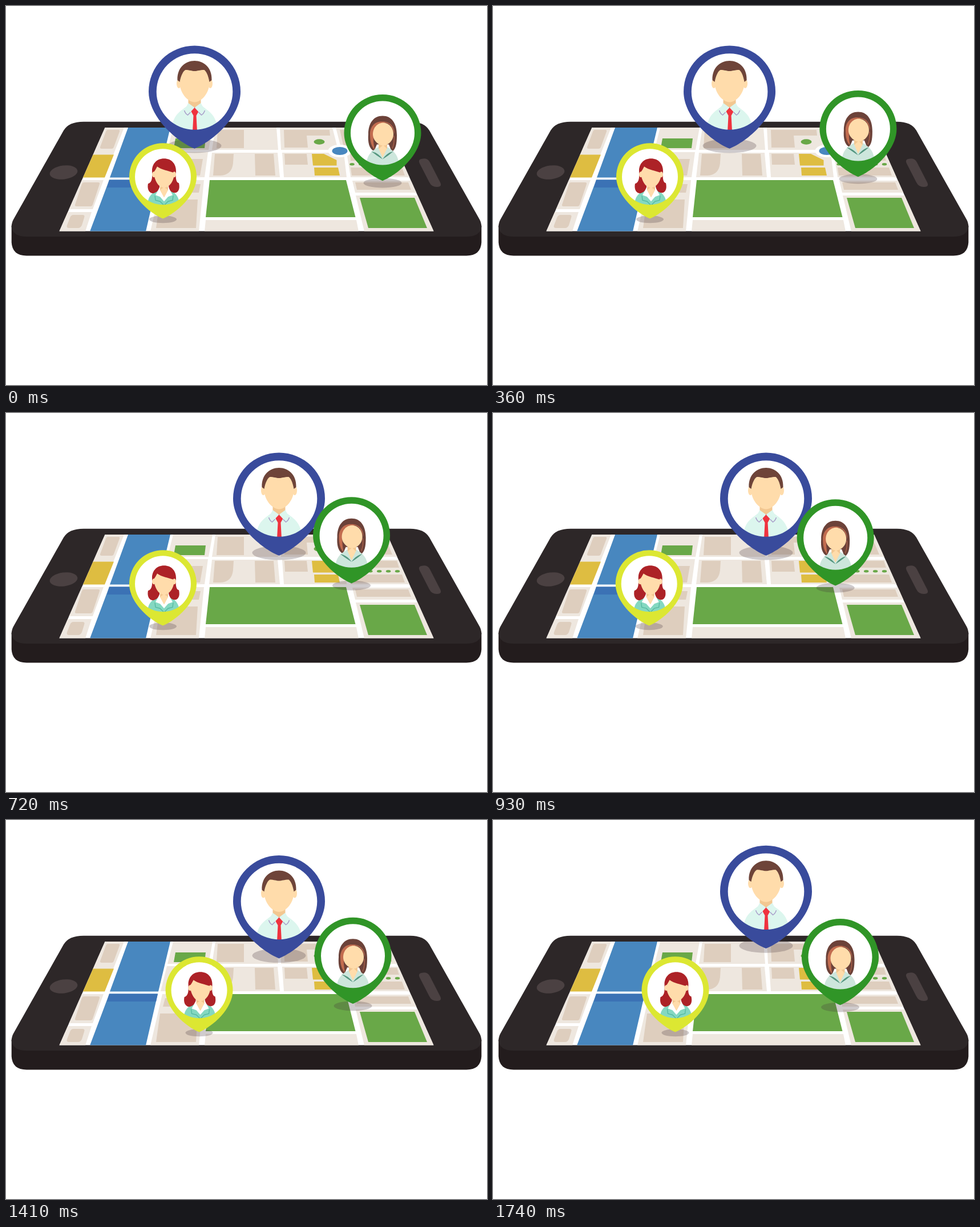
An HTML page that plays this animation: 843 px wide and 664 px high, repeating every 3740 ms.

```html
<!DOCTYPE html>
<html lang="en">
<head>
<meta charset="utf-8">
<title>Map pins</title>
<style>
html, body { margin: 0; width: 100%; height: 100%; overflow: hidden; background: #fff; }
svg { display: block; width: 843px; height: 664px; }
.block { fill: #eee7df; }
.building { fill: #decebe; }
.park { fill: #69a848; }
.water { fill: #4887bf; }
.sand { fill: #debd41; }
.skin { fill: #ffdcab; }
.shade { fill: #f2c791; }
.line { fill: none; }
.shadow { fill: #40303a; opacity: .25; }
</style>
</head>
<body>
<svg viewBox="0 0 843 664">
  <defs>
    <clipPath id="screen"><path d="M173.500 213H668L749.500 394.500H93.500Z"/></clipPath>
  </defs>

  <g id="phone">
    <path fill="#231c1d" d="M9.700 385V414Q11 437.400 36 437.400H807Q832 437.400 833.300 414V385Z"/>
    <path fill="#2d2728" d="M136 202.700H708Q733 202.700 742 218L830 374Q833.300 380 833.300 387Q831 404 807 404H36Q12 404 9.700 387Q9.700 380 13 374L101 218Q110 202.700 136 202.700Z"/>
    <ellipse cx="101" cy="291.500" rx="24.500" ry="12" fill="#4b4142" transform="rotate(-7 101 291.500)"/>
    <path fill="#4b4142" d="M731 267.500Q739 266 743 274L761 309Q765 317 755 317Q746 317 742 309L725 276Q721 268 731 267.500Z"/>
  </g>

  <g id="map" clip-path="url(#screen)">
    <path fill="#fff" d="M90 210H760V400H90Z"/>
    <g class="block">
      <path d="M150 213H207L188 261H140Z M130 305H171L152 356H100Z M100 361H150L139 395H90Z"/>
      <path d="M293 213H362L355 252H283Z M282 256H354L348 300H271Z M274 305H347L338 395H253Z"/>
      <path d="M367 213H474L477 252H361Z M361 257H476L480 300H356Z M350 375H614L618 395H348Z"/>
      <path d="M480 213H572L582 252H482Z M484 257H592L597 300H487Z"/>
      <path d="M578 213H670L690 252H588Z M597 257H690L710 300H604Z M607 306H712L722 327H612Z M613 332H724L752 395H628Z"/>
    </g>
    <g class="building">
      <path d="M178 217H197Q200 217 199 220L189 247Q188 250 185 250H168Q164 250 165 247L175 220Q176 217 178 217Z"/>
      <path d="M137 309H161Q165 309 164 312L152 348Q151 351 148 351H124Q120 351 121 348L133 312Q134 309 137 309Z"/>
      <path d="M118 366H134Q139 366 137 371L133 384Q131 389 126 389H111Q105 389 107 384L112 371Q114 366 118 366Z"/>
      <path d="M288 268H345L340 297H281Z M279 312H341L338 327H275Z M270 339H336L333 389H263Z"/>
      <path d="M371 217H417V249H369Z M366 259H399L398 275Q396 296 376 297H363Z M436 259H469L472 297H437Z"/>
      <path d="M487 217H567L568 227H527L529 248H488Z M488 259H527L529 278H489Z"/>
      <path d="M585 217H664L677 248H592Z M603 259H685L689 271H604Z M604 283H694L699 297H606Z M612 309H705L710 322H615Z"/>
    </g>
    <path class="sand" d="M152 260.500H189L173 300.500H134Z M536 259H557L579.500 270V279.500H538Z M540 283H582L585 297H541Z"/>
    <path class="water" d="M214 213H288L267 300.500H182Z M181 304.500H266L245 395H147Z"/>
    <path fill="#3b72b5" d="M181 304.500H266L263 318H177Z"/>
    <path class="park" d="M297 232H350L348 249H294Z M357 305H596L612.500 370H350Z M620 336H716L738 389H635Z"/>
    <ellipse class="park" cx="549" cy="238" rx="9.500" ry="4.700"/>
    <ellipse cx="585" cy="254" rx="20.500" ry="11" fill="#fff"/>
    <ellipse class="water" cx="585" cy="254" rx="13.500" ry="7"/>
    <g id="trees"></g>
  </g>

  <g id="blue">
    <ellipse class="shadow" cx="0" cy="95" rx="47" ry="12.500"/>
    <circle r="70" fill="#fff"/>
    <path fill="#dcf6ee" d="M-40 70V62C-36 41 -28 36 -10 23H10C28 36 36 41 40 62V70Z"/>
    <path class="shade" d="M-11 12H11V22L0 30L-11 22Z"/>
    <path fill="#ef333f" d="M-7 33L.500 27L8 33L3 42L4.500 70H-3.500L-2 42Z"/>
    <path fill="#dcf6ee" d="M-11 20L-18 33L-12 41L0 28Z M11 20L18 33L12 41L0 28Z"/>
    <path class="line" stroke="#a99fca" stroke-width="1.500" d="M-18 33Q-16 39 -12 41L-7 36M18 33Q16 39 12 41L7 36"/>
    <ellipse class="skin" cx="-27.500" cy="-14" rx="4" ry="8"/>
    <ellipse class="skin" cx="27.500" cy="-14" rx="4" ry="8"/>
    <path class="skin" d="M-26 -18C-25 -30 -20 -41 -14 -41H14C20 -41 25 -30 26 -18C27 3 11 18.500 0 18.500C-11 18.500 -27 3 -26 -18Z"/>
    <path fill="#6e4439" d="M-30 -20C-31 -42 -16 -54 0 -54C16 -54 31 -42 30 -20L26 -17C24 -29 20 -36 17 -38C9 -38 5 -36 0 -36C-5 -36 -9 -38 -16 -38C-20 -36 -24 -28 -26 -17Z"/>
  </g>

  <g id="yellow">
    <ellipse class="shadow" cx="0" cy="74.500" rx="24" ry="6.500"/>
    <circle r="51" fill="#fff"/>
    <path fill="#84d8c1" d="M-27 52C-27 36 -22 30 -8 22H12C24 30 29 36 29 52Z"/>
    <path fill="#ad2227" d="M2 -32C-11 -32 -19 -23 -19 -10C-18 4 -20 10 -26 12C-28 22 -24 28 -18 29C-10 28 -5 22 -6 15H10C10 22 14 28 21 28C28 27 30 20 28 11C23 10 22 2 23 -10C23 -23 15 -32 2 -32Z"/>
    <path fill="#fff" d="M-6 19L-13 32L-5 35L2 43L9 35L17 32L10 19L2 35Z"/>
    <path class="line" stroke="#4fb59d" stroke-width="1.200" d="M-14 33L-13 41L-5 43L2 50L9 43L17 41L18 33"/>
    <path class="shade" d="M-5 14V23L2 36L9 23V14Z"/>
    <path class="skin" d="M-5 23L2 18L9 23L2 36Z"/>
    <ellipse class="skin" cx="-16" cy="-4" rx="3" ry="5"/>
    <ellipse class="skin" cx="20" cy="-4" rx="3" ry="5"/>
    <path class="skin" d="M-16 -8C-14 -11 -12 -14 -10 -18C-2 -12 8 -11 20 -7C20 6 12 19 2 19C-8 19 -15 6 -16 -8Z"/>
  </g>

  <g id="green">
    <ellipse class="shadow" cx="0" cy="87.500" rx="33.500" ry="8.500"/>
    <circle r="58" fill="#fff"/>
    <path fill="#6c4239" d="M0 -30C-16 -30 -25 -17 -25 2C-26 16 -24 27 -15 32L-10 20H11L16 33C23 29 25 20 25 4C25 -17 16 -30 0 -30Z"/>
    <path fill="#c26c4f" d="M0 -20C-14 -21 -22 -11 -22 2C-22 14 -20 23 -14 29C-16 18 -17 8 -15 0C-9 -14 -4 -17 4 -18C13 -18 18 -10 21 2C21 -10 14 -20 0 -20Z"/>
    <path class="line" stroke="#c26c4f" d="M20 5Q21 18 17 27"/>
    <path fill="#cde6dc" d="M-29 60C-28 42 -24 34 -8 25H9C24 34 28 42 29 60Z"/>
    <path class="shade" d="M-7 15V27L0 45L8 27V15Z"/>
    <path class="skin" d="M-7 28L1 21L8 28L0 45Z"/>
    <path fill="#cde6dc" d="M-8 25L-15 32L0 46L16 32L9 25L0 43Z"/>
    <path fill="#559780" d="M-20 32Q-7 35 0 46Q-10 40 -20 32Z M19 32Q7 35 0 46Q10 40 19 32Z"/>
    <path class="skin" d="M1 -18C-9 -18 -17 -9 -17 2C-17 14 -6 22 1 22C9 22 19 14 19 2C19 -9 11 -18 1 -18Z"/>
  </g>
</svg>

<script>
const LOOP = 3740, STEP = 30, LAST = 1740;

// Each axis is a list of [time, position]; moves ease in and out between them.
const pins = [
  { id: 'blue', radius: 80.5, color: '#394b9c',
    x: [[0, 330.5], [660, 478.5]],
    y: [[1290, 150], [1620, 125.3]] },
  { id: 'green', radius: 67.5, color: '#309527',
    x: [[30, 660], [880, 600], [1500, 608.5]],
    y: [[0, 222.5], [280, 215.5], [720, 214.7], [1560, 240.5]] },
  { id: 'yellow', radius: 59, color: '#dce732',
    x: [[720, 275], [856, 271], [1480, 341], [1740, 319.5]],
    y: [[856, 299.3], [1480, 298.3]] }
];

function addShape(parent, tag, attributes) {
  const shape = document.createElementNS('http://www.w3.org/2000/svg', tag);
  for (const name in attributes) shape.setAttribute(name, attributes[name]);
  parent.append(shape);
}

function ringPath(r) {
  const hole = r * 0.83;
  return `M${-r} 0A${r} ${r} 0 0 1 ${r} 0` +
    `C${r} ${r * .55} ${r * .4} ${r * 1.08} 0 ${r * 1.24}` +
    `C${-r * .4} ${r * 1.08} ${-r} ${r * .55} ${-r} 0Z` +
    `M${-hole} 0A${hole} ${hole} 0 0 0 ${hole} 0A${hole} ${hole} 0 0 0 ${-hole} 0Z`;
}

function valueAt(keys, time) {
  if (time <= keys[0][0]) return keys[0][1];
  for (let i = 1; i < keys.length; i++) {
    const [t0, v0] = keys[i - 1], [t1, v1] = keys[i];
    if (time < t1) {
      const u = (time - t0) / (t1 - t0);
      return v0 + (v1 - v0) * u * u * (3 - 2 * u);
    }
  }
  return keys[keys.length - 1][1];
}

const trees = document.getElementById('trees');
for (let i = 0; i < 6; i++) {
  addShape(trees, 'ellipse', { class: 'park', cx: 606.5 + i * 15.9, cy: 277.3, rx: 4.2, ry: 2.2 });
}

for (const pin of pins) {
  pin.group = document.getElementById(pin.id);
  addShape(pin.group, 'path', { d: ringPath(pin.radius), fill: pin.color, 'fill-rule': 'evenodd' });
}

function draw(time) {
  for (const { group, x, y } of pins) {
    group.setAttribute('transform', `translate(${valueAt(x, time)} ${valueAt(y, time)})`);
  }
}

const start = performance.now();
function tick() {
  const time = (performance.now() - start) % LOOP;
  draw(Math.min(LAST, Math.floor(time / STEP) * STEP));
  requestAnimationFrame(tick);
}
draw(0);
requestAnimationFrame(tick);
</script>
</body>
</html>
```
